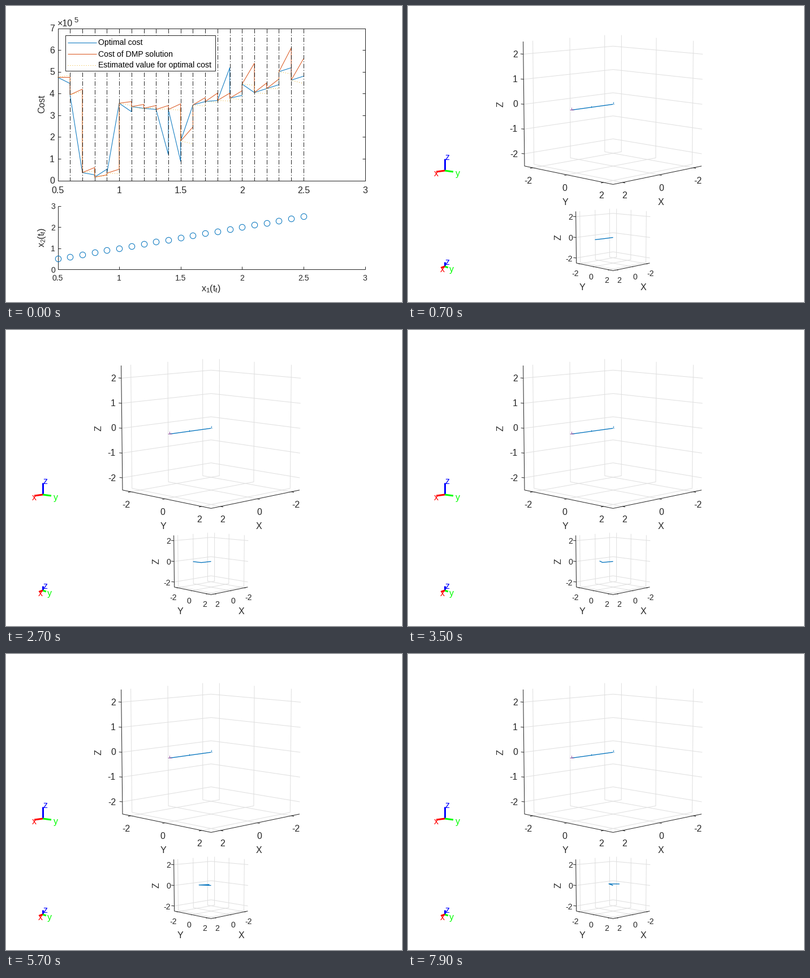
Write a matplotlib script that moves like this. It is 700 px wide and 525 px high and loops after 8000 ms.

```python
import numpy as np
import matplotlib.pyplot as plt
from matplotlib.animation import FuncAnimation
from matplotlib.patches import Rectangle

W, H, DPI = 700, 525, 100
PX = 72 / DPI  # points per pixel
INK = "#262626"
BLUE, ORANGE, YELLOW, PURPLE = "#0072BD", "#D95319", "#EDB120", "#7E2F8E"
plt.rcParams["font.family"] = "Liberation Sans"

fig = plt.figure(figsize=(W / DPI, H / DPI), dpi=DPI, facecolor="white")


def stage():
    """Transparent layer whose units are pixels, y pointing down."""
    ax = fig.add_axes([0, 0, 1, 1])
    ax.set(xlim=(0, W), ylim=(H, 0))
    ax.axis("off")
    return ax


def line(ax, xs, ys, color=INK, width=1, **kw):
    kw.setdefault("solid_capstyle", "butt")
    return ax.plot(xs, ys, color=color, lw=width * PX, **kw)[0]


def label(ax, x, y, text, size=16, ha="center", color=INK, upright=False):
    shift = 0.36 * size
    if upright:
        x += shift
    else:
        y += shift
    ax.text(x, y, text, fontsize=size * PX, ha=ha, va="baseline", color=color,
            rotation=90 if upright else 0, rotation_mode="anchor")


def number(v):
    return f"{v:g}"


# ---- flat plots ----
X_TICKS = np.arange(0.5, 3.01, 0.5)


def x_px(x):
    return 91.5 + (np.asarray(x) - 0.5) * 217.2


def draw_cost(ax):
    top, base, right = 39.5, 309.5, 634.5
    # pixel heights at the start and end of each interval
    start = [126, 157, 295, 303, 296, 172, 178, 181, 183, 183,
             239, 175, 169, 167, 163, 138, 153, 146, 116, 131]
    optimal = [137, 295, 299, 289, 172, 187, 181, 183, 263, 275,
               175, 169, 167, 109, 158, 153, 146, 139, 109, 124]
    dmp = [126, 147, 286, 299, 289, 169, 174, 176, 176, 173,
           214, 162, 154, 154, 150, 101, 136, 129, 74, 93]
    guess = [122, 151, 292, 300, 297, 176, 182, 180, 182, 184,
             244, 177, 170, 168, 166, 140, 155, 146, 120, 137]
    knots = 0.5 + 0.1 * np.arange(21)
    xs = x_px(np.repeat(knots, 2)[1:-1])
    dots = dict(ls=(0, (1, 3)), dash_capstyle="butt")

    for end, color, style in ((optimal, BLUE, {}), (dmp, ORANGE, {}),
                              (guess, YELLOW, dots)):
        line(ax, xs, np.ravel(np.column_stack([start, end])) + 0.5, color, **style)
    for x in x_px(knots[1:]):
        line(ax, [x, x], [top, base], INK, ls=(0, (8, 3, 1.5, 3)),
             dash_capstyle="butt")

    ax.add_patch(Rectangle((91.5, top), right - 91.5, base - top, fill=False,
                           ec=INK, lw=PX))
    for v in X_TICKS:
        x = x_px(v)
        line(ax, [x, x], [base, base - 5], INK)
        line(ax, [x, x], [top, top + 5], INK)
        label(ax, x, 326.5, number(v))
    for v in range(8):
        y = base - v * (base - top) / 7
        line(ax, [91.5, 97], [y, y], INK)
        line(ax, [right - 5, right], [y, y], INK)
        label(ax, 86, y, number(v), ha="right")
    label(ax, 62, 174, "Cost", upright=True)
    label(ax, 91, 30, "×10", ha="left")
    label(ax, 121, 24, "5", size=13, ha="left")

    ax.add_patch(Rectangle((104.5, 51.5), 265, 63, fc="white", ec=INK, lw=PX,
                           zorder=5))
    rows = (("Optimal cost", BLUE, {}), ("Cost of DMP solution", ORANGE, {}),
            ("Estimated value for optimal cost", YELLOW, dots))
    for i, (text, color, style) in enumerate(rows):
        y = 64.5 + 20 * i
        line(ax, [109, 160], [y, y], color, zorder=6, **style)
        ax.text(163, y + 5, text, fontsize=14 * PX, va="baseline", color="black",
                zorder=6)


def draw_goals(ax):
    top, base = 354.5, 467
    step = (base - top) / 3
    line(ax, [91.5, 91.5, 634.5], [top, base, base])
    for v in X_TICKS:
        x = x_px(v)
        line(ax, [x, x], [base, base - 5])
        label(ax, x, 481.5, number(v), size=14)
    for v in range(4):
        y = base - v * step
        line(ax, [91.5, 97], [y, y])
        label(ax, 87, y + 0.5, number(v), size=14, ha="right")
    goals = 0.5 + 0.1 * np.arange(21)
    ax.plot(x_px(goals), base - goals * step, "o", ms=10.4 * PX, mfc="none",
            mec=BLUE, mew=PX)
    label(ax, 362, 500, r"$\mathregular{x_1(t_f)}$")
    label(ax, 62, 411, r"$\mathregular{x_2(t_f)}$", upright=True)


# ---- robot views ----
ELEV = np.radians(8)
CAMERA = 46
LIM = 2.5
LINKS = 1.2, 1.04


class View:
    """Perspective view along the x = y diagonal."""

    def __init__(self, ax, cx, cy, scale):
        self.ax, self.cx, self.cy, self.scale = ax, cx, cy, scale

    def project(self, pts):
        x, y, z = np.asarray(pts, float).T
        side, near = (y - x) / np.sqrt(2), (x + y) / np.sqrt(2)
        depth = near * np.cos(ELEV) + z * np.sin(ELEV)
        k = self.scale / (1 - depth / CAMERA)
        return (self.cx + k * side,
                self.cy + k * (near * np.sin(ELEV) - z * np.cos(ELEV)))

    def path(self, *pts, color=INK, **kw):
        return line(self.ax, *self.project(pts), color, **kw)

    def frame(self, z_ticks):
        a, grid = LIM, "#DFDFDF"
        for v in (-2, 0, 2):
            self.path((v, a, -a), (v, -a, -a), (v, -a, a), color=grid)
            self.path((a, v, -a), (-a, v, -a), (-a, v, a), color=grid)
        for v in z_ticks:
            self.path((a, -a, v), (-a, -a, v), (-a, a, v), color=grid)
        self.path((a, -a, a), (a, -a, -a), (a, a, -a), (-a, a, -a))
        for v in (-2, 0, 2):
            self.path((a, v, -a), (a + 0.14, v, -a))
            self.path((v, a, -a), (v, a + 0.14, -a))
        for v in z_ticks:
            x, y = self.project([(a, -a, v)])
            line(self.ax, [x[0] - 5, x[0]], [y[0] - 0.5, y[0]])


def arm(t1, t2):
    a1, a2 = np.radians([t1, t2])
    joint = np.array([np.cos(a1), np.sin(a1), 0]) * LINKS[0]
    tip = joint + np.array([np.cos(a2), np.sin(a2), 0]) * LINKS[1]
    return [(0, 0, 0), joint, tip]


def floor_labels(ax, left, top, step, drop, size):
    """Mirrored tick labels of the two floor axes around x = 362.5."""
    for i, v in enumerate((-2, 0, 2)):
        x, y = left + i * step, top + i * drop
        label(ax, x, y, number(v), size)
        label(ax, 724.5 - x, y, number(v), size)


def triad(ax, x, y, up, arm_len, names):
    for dx, dy, color in ((0, -up, "blue"), (arm_len, 2, "lime"),
                          (-arm_len, 2, "red")):
        line(ax, [x, x + dx], [y, y + dy], color, 3)
    for (tx, ty), text, color in zip(names, "zxy", ("blue", "red", "lime")):
        label(ax, tx, ty, text, color=color)


def draw_large(ax):
    view = View(ax, 362.5, 174.3, 44.6)
    z_ticks = range(-2, 3)
    view.frame(z_ticks)
    for v in z_ticks:
        label(ax, 194, 173.5 - 44.2 * v, number(v), ha="right")
    floor_labels(ax, 212, 309, 65, 13, 16)
    label(ax, 278, 347.5, "Y")
    label(ax, 447, 347.5, "X")
    label(ax, 163, 174.5, "Z", upright=True)
    pose = arm(0, 0)
    view.path(*pose, color=BLUE, width=1.3)
    xs, ys = view.project(pose)
    for x, y, h, color in zip(xs, ys, (4, 3, 4), (BLUE, BLUE, PURPLE)):
        line(ax, [x, x], [y - h, y], color, 0.8)
    line(ax, [xs[2] - 3, xs[2] + 4], [ys[2], ys[2]], PURPLE, 0.8)
    line(ax, [xs[0], xs[0] + 3], [ys[0], ys[0] + 0.5], "#9FC5E0", 0.8)
    triad(ax, 65, 292, 21, 15, [(69, 267), (50, 296), (88, 296)])


def draw_small(ax):
    view = View(ax, 362.5, 410.5, 18.5)
    z_ticks = (-2, 0, 2)
    view.frame(z_ticks)
    for v in z_ticks:
        label(ax, 291, 411 - 18.3 * v, number(v), size=14, ha="right")
    floor_labels(ax, 296, 473.5, 27.5, 6, 14)
    label(ax, 308, 498, "Y")
    label(ax, 416, 498, "X")
    label(ax, 265, 410.5, "Z", upright=True)
    triad(ax, 65, 462, 8, 6, [(69, 453), (61, 466), (77, 466)])
    return view


cost, goals, large, small = (stage() for _ in range(4))
draw_cost(cost)
draw_goals(goals)
draw_large(large)
view = draw_small(small)
robot = line(small, [], [], BLUE, 1.3)

# joint directions in degrees over time in seconds
TIMES = [0.2, 0.9, 1.8, 2.7, 3.5, 4.7, 5.4, 6.6, 7.9]
FIRST = [0, -1, -3, -5, -11, -37, -53, -83, -115]
SECOND = [0, -9, -40, -85, -118, -173, -203, -223, -230]


def update(i):
    t = i / 10
    cost.set_visible(i == 0)
    goals.set_visible(i < 2)
    large.set_visible(i > 0)
    small.set_visible(i > 1)
    pose = arm(np.interp(t, TIMES, FIRST), np.interp(t, TIMES, SECOND))
    robot.set_data(*view.project(pose))
    return [robot]


anim = FuncAnimation(fig, update, frames=80, interval=100, repeat=True,
                     repeat_delay=0, blit=False)
plt.show()
```
